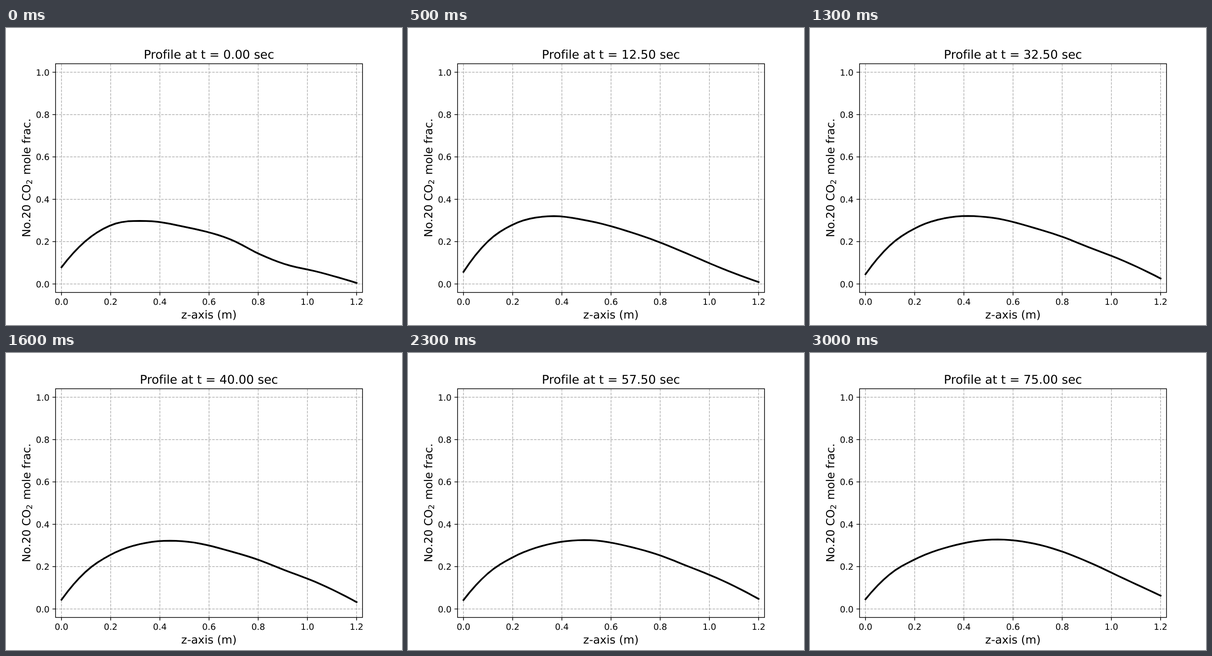
An HTML page that plays this animation: 864 by 648 pixels, repeating every 3.1 s.

```html
<!DOCTYPE html>
<html lang="en">
<head>
<meta charset="utf-8">
<style>
  html, body { margin: 0; width: 100%; height: 100%; overflow: hidden; background: #fff; }
  svg { display: block; width: 864px; height: 648px; font-family: "DejaVu Sans", sans-serif; }
  text { font-variant-ligatures: none; text-rendering: geometricPrecision; }
  path { fill: none; stroke: #000; stroke-width: 1.5; }
  .grid { stroke: #b0b0b0; stroke-dasharray: 5.55 2.4; }
  .ticks { font-size: 18.75px; }
  .label { font-size: 24.375px; }
  .title { font-size: 26.25px; }
  .middle { text-anchor: middle; }
  #curve { stroke-width: 3.75; stroke-linecap: square; stroke-linejoin: round; }
</style>
</head>
<body>
<svg viewBox="0 0 864 648">
  <g id="axes" class="ticks"></g>
  <path id="curve"/>
  <path d="M108.2 78H777.8V577H108.2Z"/>
  <text id="title" class="title middle" x="442.8" y="66.6"></text>
  <text class="label middle" x="442.8" y="634">z-axis (m)</text>
  <text class="label" transform="translate(53.3 456.5) rotate(-90)">No.20 CO<tspan dy="4" font-size="17.06">2</tspan><tspan dx="2.4" dy="-4"> mole frac.</tspan></text>
</svg>
<script>
const STEP_MS = 100, STEPS = 31, SEC_PER_STEP = 2.5;
const px = z => 121.1 + 536.5 * z;
const py = v => 558.5 - 462 * v;

// Mole fraction at a few positions z (m), for four moments (s)
const knots = [0, 0.1, 0.2, 0.35, 0.5, 0.7, 0.8, 0.9, 1.05, 1.2];
const times = [0, 12.5, 32.5, 75];
const profiles = [
  [0.079, 0.205, 0.277, 0.297, 0.270, 0.204, 0.144, 0.097, 0.055, 0.005],
  [0.057, 0.202, 0.280, 0.320, 0.300, 0.237, 0.196, 0.148, 0.074, 0.009],
  [0.046, 0.183, 0.262, 0.316, 0.315, 0.260, 0.223, 0.177, 0.109, 0.026],
  [0.046, 0.165, 0.234, 0.297, 0.327, 0.305, 0.271, 0.225, 0.144, 0.063]
];

// Cubic Hermite through unevenly spaced points, parabolic at both ends
function spline(xs, ys, x) {
  const last = xs.length - 1;
  const slope = i => (ys[i + 1] - ys[i]) / (xs[i + 1] - xs[i]);
  const tangent = i => {
    if (i === 0) return 2 * slope(0) - tangent(1);
    if (i === last) return 2 * slope(last - 1) - tangent(last - 1);
    const a = xs[i] - xs[i - 1], b = xs[i + 1] - xs[i];
    return (slope(i - 1) * b + slope(i) * a) / (a + b);
  };
  let i = 0;
  while (i < last - 1 && x > xs[i + 1]) i++;
  const h = xs[i + 1] - xs[i], s = (x - xs[i]) / h, r = 1 - s;
  return r * r * (1 + 2 * s) * ys[i] + s * s * (1 + 2 * r) * ys[i + 1]
    + h * s * r * (r * tangent(i) - s * tangent(i + 1));
}

function drawAxes() {
  let out = '';
  for (let i = 0; i <= 6; i++) {
    const label = (i / 5).toFixed(1), x = px(i / 5), y = py(i / 5);
    out += `<path class="grid" d="M${x} 577V78"/><path d="M${x} 577v6.56"/>
      <text class="middle" x="${x}" y="604">${label}</text>`;
    if (i < 6) out += `<path class="grid" d="M108 ${y}H778"/><path d="M108 ${y}h-6.56"/>
      <text x="95" y="${y + 7}" text-anchor="end">${label}</text>`;
  }
  document.getElementById('axes').innerHTML = out;
}

const title = document.getElementById('title');
const curve = document.getElementById('curve');

function draw(seconds) {
  title.textContent = `Profile at t = ${seconds.toFixed(2)} sec`;
  const values = knots.map((_, k) => spline(times, profiles.map(row => row[k]), seconds));
  const points = Array.from({ length: 50 }, (_, i) => {
    const z = 1.2 * i / 49;
    return `${px(z).toFixed(2)} ${py(spline(knots, values, z)).toFixed(2)}`;
  });
  curve.setAttribute('d', 'M' + points.join('L'));
}

let shown = -1;
function tick() {
  const step = Math.floor(performance.now() / STEP_MS) % STEPS;
  if (step !== shown) draw((shown = step) * SEC_PER_STEP);
  requestAnimationFrame(tick);
}

drawAxes();
tick();
</script>
</body>
</html>
```
